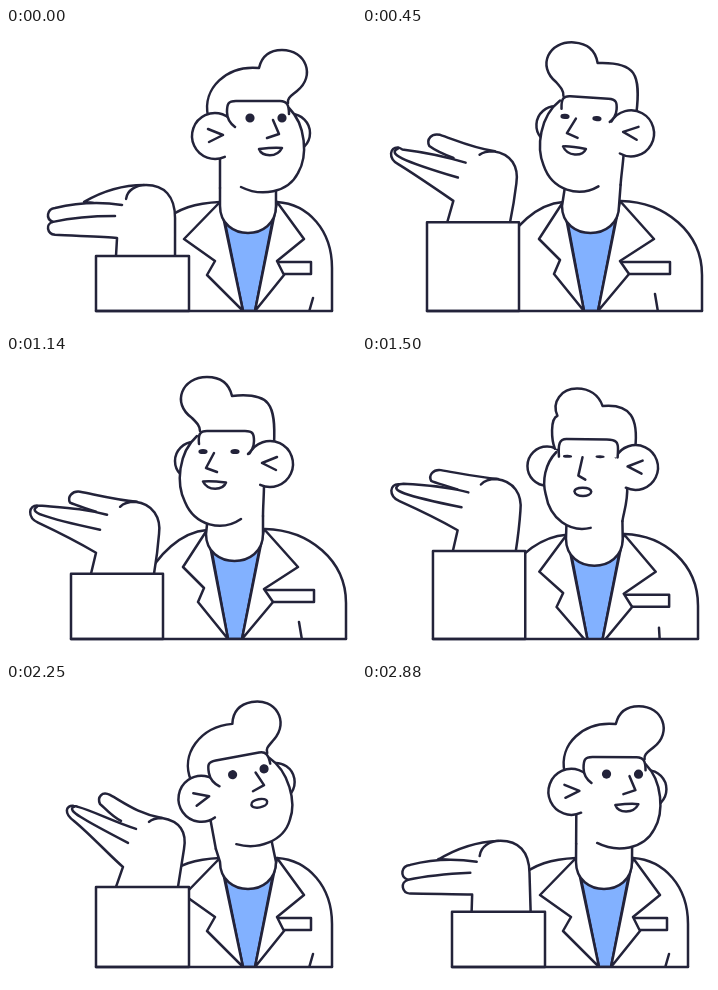
Write an HTML page with a canvas that moves like this. It is 350 by 300 pixels and loops after 2.91 s.

```html
<!DOCTYPE html>
<html lang="en">
<head>
<meta charset="utf-8">
<title>Doctor presenting</title>
<style>
html, body { margin: 0; width: 100%; height: 100%; overflow: hidden; background: #fff; }
canvas { display: block; }
</style>
</head>
<body>
<canvas id="stage" width="350" height="300"></canvas>
<script>
const ctx = document.getElementById('stage').getContext('2d');
const LOOP = 2910, WAVE = LOOP / 3;
const INK = '#23233a', BLUE = '#82b1ff', WHITE = '#fff';

// Body: facing right, facing left
const BODY = {
  coat: ['M155 195 C172 180 190 175 214 174 M271 174 C302 176 326 202 326 240 L326 300 L150 300',
         'M138 226 C152 198 175 176 201 174 M259 173 C303 174 340 204 340 247 L340 300 L150 300'],
  pocket: ['M262 234 L305 234 L305 246 L262 246 Z', 'M250 234 L308 234 L308 246 L250 246 Z'],
  crease: ['M307 270 L303 284', 'M293 266 L296 284'],
  shirt: ['M215 175 L237 283 L249 283 L270 175 Z', 'M202 175 L222 283 L236 283 L257 175 Z'],
  lapelL: ['M214 174 L178 211 L209 233 L201 247 L237 283 Z', 'M201 174 L177 211 L198 232 L192 246 L222 283 Z'],
  lapelR: ['M271 174 L298 211 L271 233 L278 247 L249 283 Z', 'M258 173 L292 211 L258 233 L267 246 L236 283 Z']
};

// Head, drawn looking left around x = 0: frontal, turned right (mirrored when drawn), turned left
const HEAD = {
  hair: ['M-41 106 C-47 95 -48 60 -31 58 C-26 45 -17 41 -8 41 C3 41 13 47 18 57 C39 55 48 72 44 95',
         'M-43 75 C-42 70 -46 68 -52 63 C-71 48 -61 22 -37 22 C-26 22 -17 27 -14 40 C18 37 43 60 37 88',
         'M-40 75 C-40 70 -43 67 -48 62 C-69 47 -58 21 -33 21 C-20 21 -11 27 -8 40 C30 36 36 48 34 88'],
  face: ['M-36 108 C-42 116 -45 124 -45 133 C-45 158 -30 177 -8 178',
         'M-44 80 C-61 97 -63 128 -53 145 C-43 165 -16 169 4 159',
         'M-43 80 C-62 97 -64 128 -55 146 C-45 170 -18 176 1 163'],
  cheek: ['L31 165 L30 100', 'L22 118 L18 84', 'L22 118 L18 84'],
  nape: ['M38 130 C40 148 33 160 31 168', 'M25 128 C25 140 25 150 25 160', 'M24 128 C24 140 23 150 23 160'],
  hairline: ['M-33 110 C-34 95 -33 89 -26 89 L16 89 C27 89 29 92 29 98 C29 100 31 102 33 103',
             'M-44 86 C-44 77 -42 73 -35 73 L9 73 C17 73 18 76 18 84 C18 92 14 96 10 99',
             'M-41 88 C-42 78 -40 75 -33 75 L5 75 C13 75 14 78 14 85 C14 92 11 95 8 98'],
  nose: ['M-3 104 L-4 125 L0 129', 'M-28 92 L-34 106 L-22 110', 'M-26 97 L-34 112 L-23 116']
};
const SMILE = 'M-37 120 C-30 119 -22 120 -14 121 C-17 129 -32 130 -37 120';
const OPEN = 'M-34 123 C-34 117.5 -18 117.5 -18 123 C-18 128.5 -34 128.5 -34 123';

// Hand, relative to the cuff's top left corner; five poses each
const FAR_FINGER = [
  'M10 -50 C5 -51 -2 -54 -12 -54 C-12 -54 -12 -54 -12 -54 C5 -64 25 -71 48 -71',
  'M25 -62 C10 -67 3 -69 -1 -71 C-4 -77 1 -83 9 -82 C25 -79 45 -74 66 -72',
  'M25 -66 C14 -72 8 -80 4 -83 C1 -90 6 -96 14 -92 C27 -85 42 -73 66 -69',
  'M5 -50 C0 -52 -10 -54 -23 -54 C-23 -54 -23 -54 -23 -54 C-5 -60 15 -69 41 -71',
  'M5 -50 C0 -51 -10 -52 -20 -52 C-20 -52 -20 -52 -20 -52 C0 -61 15 -66 43 -71'];
const FINGERS = [
  'M20 0 L21 -18 C8 -19 -22 -20 -41 -21 C-49 -22 -51 -32 -43 -34 C-51 -37 -49 -47 -41 -48 C-20 -53 0 -55 26 -51',
  'M20 0 L25 -21 C8 -31 -18 -44 -33 -51 C-44 -56 -43 -69 -33 -68 C-32 -68 -30 -68 -29 -68 C-5 -66 15 -65 36 -59',
  'M20 0 L27 -20 C15 -30 -5 -52 -22 -66 C-32 -73 -31 -82 -22 -81 C-21 -81 -20 -81 -18 -80 C-3 -76 18 -65 40 -58',
  'M17 0 L16 -12 C0 -14 -25 -19 -40 -23 C-58 -26 -60 -37 -46 -37 C-50 -42 -49 -56 -39 -57 C-32 -57 -15 -54 19 -47',
  'M17 0 L16 -13 C0 -14 -25 -14 -44 -14 C-57 -14 -57 -31 -46 -34 C-55 -38 -54 -50 -42 -50 C-30 -52 0 -52 20 -47'];
const PALM = [
  'M30 -57 C31 -66 40 -71 50 -71 C68 -71 79 -60 79 -38 C79 -25 79 -12 79 0',
  'M49 -67 C53 -71 59 -72 64 -72 C82 -70 90 -56 88 -40 C87 -27 85 -12 83 0',
  'M53 -65 C57 -69 62 -69 66 -69 C84 -66 91 -55 88 -38 C86 -25 84 -12 82 0',
  'M19 -51 C21 -64 30 -71 42 -71 C58 -71 69 -62 70 -45 C72 -30 75 -15 78 0',
  'M20 -52 C23 -65 32 -72 43 -72 C60 -72 70 -63 71 -45 C73 -30 76 -15 78 0'];
const FINGER_GAP = [
  'M-43 -34 C-25 -38 0 -40 19 -40',
  'M-34 -67 C-42 -62 -32 -57 29 -44',
  'M-22 -80 C-30 -77 -14 -68 32 -44',
  'M-46 -37 C-30 -37 -5 -35 17 -35',
  'M-46 -34 C-30 -35 0 -34 18 -34'];
const BEATS = [0, 170, 310, 520, 720, 805], POSES = [0, 1, 2, 1, 3, 4];

const lerp = (a, b, u) => a + (b - a) * u;
const ease = u => u * u * (3 - 2 * u);
const ramp = (t, a, b) => ease(Math.min(1, Math.max(0, (t - a) / (b - a))));

function keyed(t, keys) {
  const i = keys.findIndex(k => k[0] > t);
  const [t0, a] = keys[i - 1], [t1, b] = keys[i];
  return lerp(a, b, ramp(t, t0, t1));
}

// Combines the matching numbers of several paths into one path
const NUM = /-?[\d.]+/g;
function blend(paths, combine) {
  const rows = paths.map(p => p.match(NUM).map(Number));
  let i = 0;
  return paths[0].replace(NUM, () => {
    const column = rows.map(r => r[i]);
    i++;
    return combine(column).toFixed(2);
  });
}
const mix = (pair, u) => blend(pair, ([a, b]) => lerp(a, b, u));

// Smooth periodic curve through the hand poses
function wave(v, t) {
  const n = BEATS.length;
  const at = j => BEATS[(j + n) % n] + WAVE * Math.floor(j / n);
  const val = j => v[POSES[(j + n) % n]];
  const i = BEATS.filter(b => b <= t).length - 1;
  const h = at(i + 1) - at(i), u = (t - at(i)) / h;
  const slope = j => (val(j + 1) - val(j - 1)) / (at(j + 1) - at(j - 1)) * h;
  return lerp(val(i), val(i + 1), ease(u)) +
    slope(i) * u * (1 - u) ** 2 - slope(i + 1) * u * u * (1 - u);
}

function fill(d, color) {
  ctx.fillStyle = color;
  ctx.fill(new Path2D(d.replace(/(?!^)M/g, 'L')));
}
const line = d => ctx.stroke(new Path2D(d));
function shape(d, color = WHITE) {
  fill(d, color);
  line(d);
}

function ear(x, y, r, side, { whole, fold }) {
  ctx.save();
  ctx.translate(x, y);
  ctx.scale(side, 1);
  ctx.fillStyle = WHITE;
  ctx.beginPath();
  ctx.arc(0, 0, r, 0, 7);
  ctx.fill();
  ctx.beginPath();
  ctx.arc(0, 0, r, whole ? 0 : 1.13, whole ? 7 : 5.81);
  ctx.stroke();
  if (fold) line('M-7 -7 L8 -1 L-6 6');
  ctx.restore();
}

function drawBody(turn, dip) {
  const part = name => mix(BODY[name], turn);
  ctx.save();
  ctx.beginPath();
  ctx.rect(0, 0, 350, 283);
  ctx.clip();
  ctx.translate(0, dip);
  shape(part('coat'));
  line(part('crease'));
  shape(part('pocket'));
  shape(part('shirt'), BLUE);
  shape(part('lapelL'));
  shape(part('lapelR'));
  ctx.restore();
}

function drawHead(t, turn, dip) {
  const side = turn < .5 ? -1 : 1;
  const q = Math.abs(2 * turn - 1);
  const part = name => {
    const [front, right, left] = HEAD[name];
    return mix([front, side < 0 ? right : left], q);
  };
  const tilt = keyed(t, [[0, 0], [200, -2.5], [480, 4], [720, 3.2], [1140, 0], [1340, -2],
    [1560, 1], [1770, 0], [2220, -10.5], [2330, -10.5], [2770, 2.8], [LOOP, 0]]);
  const lift = keyed(t, [[0, 0], [210, 1.5], [480, -5], [720, 0], [1140, 0], [1340, -5], [1560, 1.5], [1770, 0], [LOOP, 0]]);
  const squint = keyed(t, [[0, 4.6], [160, 1.3], [220, 1.3], [450, 2.6], [1380, 2.6], [1540, 1.3], [1720, 4.6], [LOOP, 4.6]]);
  const open = keyed(t, [[0, 0], [150, 1], [250, 1], [450, 0], [1360, 0], [1540, 1], [2400, 1], [2740, 0], [LOOP, 0]]);

  const pose = new DOMMatrix()
    .translate(239 - 5 * turn - 3.5 * Math.sin(Math.PI * turn), 185 + lift)
    .rotate(tilt).scale(side, 1).translate(0, -185);
  const spot = (x, y) => {
    const p = pose.transformPoint(new DOMPoint(x, y));
    return p.x.toFixed(2) + ' ' + p.y.toFixed(2);
  };

  // Neck, from the nape round the collar to under the jaw
  const left = lerp(214, 200, turn), right = lerp(270, 257, turn);
  const [near, far] = side < 0 ? [left, right] : [right, left];
  const y = 178 + dip;
  const [napeX, napeY] = part('nape').match(NUM).slice(-2);
  shape(`M${spot(napeX, napeY)} L${near} ${y} ` +
    `C${near} ${y + 36} ${far} ${y + 36} ${far} ${y} L${spot(lerp(-26, -31, q), lerp(162, 150, q))}`);

  ctx.save();
  ctx.transform(pose.a, pose.b, pose.c, pose.d, pose.e, pose.f);
  ear(lerp(-50, -46, q), lerp(114, 105, q), lerp(20, 19, q), 1, { whole: true, fold: q < .3 });
  const face = part('face');
  fill(face + part('cheek'), WHITE);
  line(face);
  shape(part('hair'));
  line(part('nape'));
  ear(lerp(48, 30, q), lerp(113, 108, q), lerp(22, 23, q), -1, { fold: true });
  const hairline = part('hairline');
  fill(hairline, WHITE);
  line(hairline);
  line(part('nose'));

  ctx.translate(0, 5.5 * turn * q);
  ctx.fillStyle = INK;
  for (const x of [lerp(-21, -37, q), lerp(12, -5, q)]) {
    ctx.beginPath();
    ctx.ellipse(x, lerp(105, 90, q), 4.6, squint, 0, 0, 7);
    ctx.fill();
  }
  ctx.translate(24 * (1 - q), 19 * (1 - q));
  shape(mix([SMILE, OPEN], open));
  ctx.restore();
}

function drawArm(t, turn, dip) {
  const phase = t % WAVE;
  const part = poses => blend(poses, v => wave(v, phase));
  const x = 90 - 25 * turn - dip / 4;
  const y = 228 - 17 * (1 - Math.cos(2 * Math.PI * (phase + 8) / WAVE));
  ctx.save();
  ctx.translate(x, y);
  shape(part(FAR_FINGER));
  shape(part(FINGERS) + part(PALM));
  line(part(FINGER_GAP));
  ctx.restore();
  shape(`M${x} ${y} H${x + 93 - turn} V283 H${x} Z`);
  line(`M${x} 283 H${326 + 14 * turn}`);
}

function frame(now) {
  const t = now % LOOP;
  const turn = ramp(t, 0, 400) - ramp(t, 1360, 1760);
  const dip = 6 * Math.sin(Math.PI * turn);
  ctx.fillStyle = WHITE;
  ctx.fillRect(0, 0, 350, 300);
  ctx.strokeStyle = INK;
  ctx.lineWidth = 2.5;
  ctx.lineCap = ctx.lineJoin = 'round';
  drawBody(turn, dip);
  drawHead(t, turn, dip);
  drawArm(t, turn, dip);
}

const start = performance.now();
(function tick() {
  frame(performance.now() - start);
  requestAnimationFrame(tick);
})();
</script>
</body>
</html>
```
